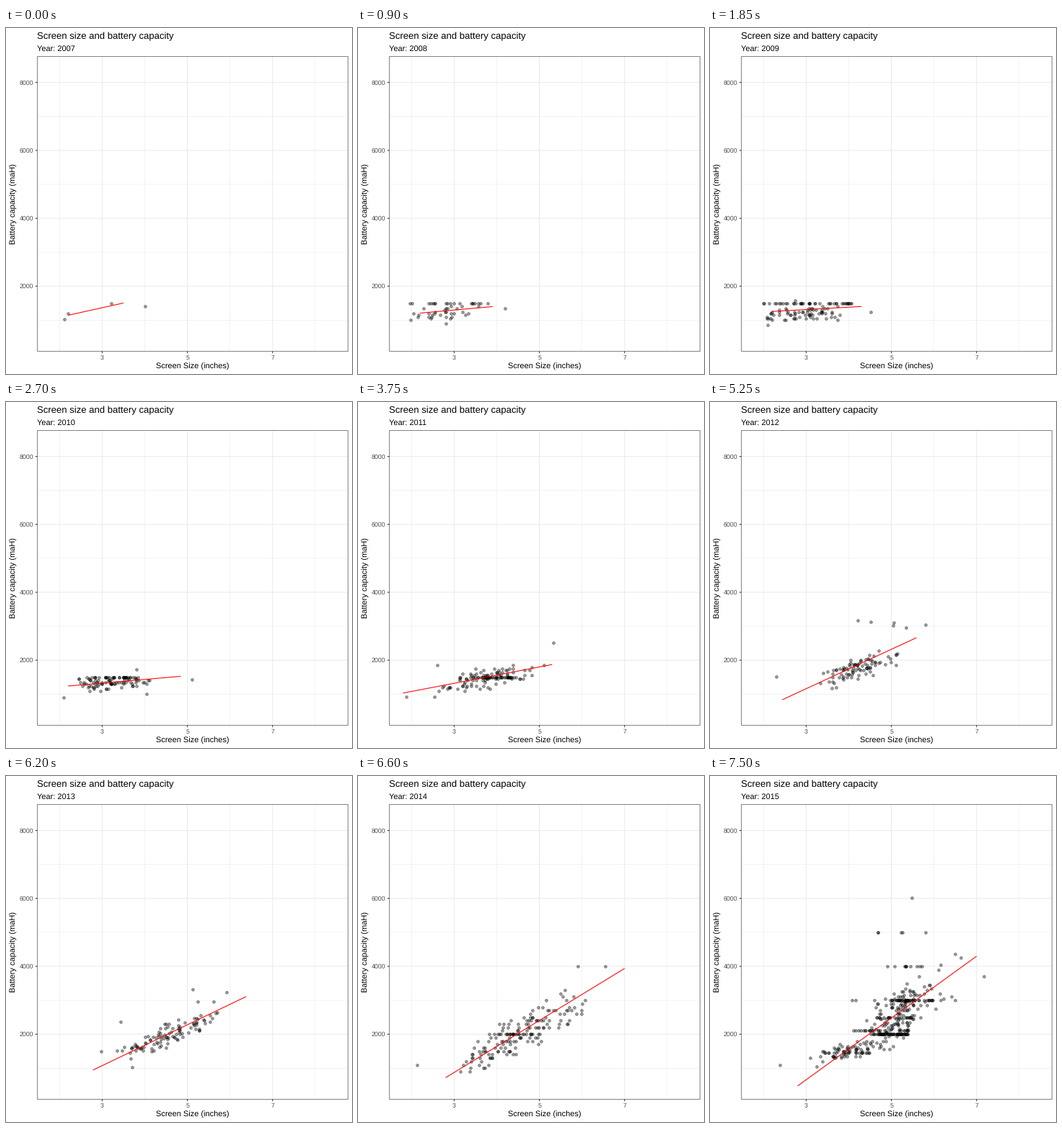
A matplotlib script that plays this animation: 480x480 px, repeating every 8000 ms.

```python
import numpy as np
import matplotlib.pyplot as plt
from matplotlib.animation import FuncAnimation

plt.rcParams["font.family"] = "Liberation Sans"
plt.rcParams["text.hinting"] = "none"

SIZE, DPI, INTERVAL, FRAMES = 480, 80, 50, 160
FIRST_HOLD, CYCLE, STEPS = 10, 19, 9
LEFT, TOP, RIGHT, BOTTOM = 43.5, 39.5, 474.5, 448.5
GRID, DARK, TICK_TEXT = "#EBEBEB", "#333333", "#4D4D4D"
rng = np.random.default_rng(7)


def px(n):
    """Pixels to points."""
    return n * 72 / DPI


def sx(inches):
    return 133.4 + 59.1 * (inches - 3)


def sy(mah):
    return 452.4 - 0.0471 * mah


# Phones of each year, as (inches, mAh)

def band(n, lo, hi, mah):
    """Phones sharing one common battery size."""
    return np.column_stack([rng.uniform(lo, hi, n), np.full(n, mah)])


def trail(n, mid, reach, base, slope, noise, step=50):
    """Phones around a rising line, with rounded battery sizes."""
    x = rng.triangular(mid - reach, mid, mid + reach, n)
    y = base + slope * (x - mid) + rng.triangular(-noise, 0, noise, n)
    return np.column_stack([x, np.maximum(np.round(y / step) * step, 900)])


def year_of(standouts, *groups, shuffle=True):
    body = np.vstack(groups)
    if shuffle:
        body = rng.permutation(body)
    return np.vstack([standouts, body])


def unmix(seen, known, share):
    """Undo a blend that holds the given share of known points."""
    return (seen - share * known[:len(seen)]) / (1 - share)


pts07 = np.array([(2.11, 1030), (2.2, 1205), (3.22, 1505), (4, 1400)])

pts08 = year_of([(1.96, 1500), (4.2, 1350), (2.8, 900)],
                band(18, 2, 3.8, 1500),
                trail(30, 2.8, .9, 1200, 60, 270))

pts09 = year_of([(4.05, 1500), (2.74, 1590), (2.1, 860), (4.52, 1235)],
                band(40, 1.98, 4.1, 1500),
                trail(66, 2.95, 1.1, 1200, 40, 280), shuffle=False)

pts10 = unmix(year_of([(5.1, 1435), (3.81, 1735), (2.09, 905), (4.04, 1000)],
                      band(32, 2.6, 3.85, 1500),
                      trail(73, 3.2, 1, 1310, 40, 250), shuffle=False),
              pts09, 2 / 9)

pts11 = year_of([(5.33, 2505), (5.1, 1855), (1.87, 920), (2.53, 915),
                 (2.6, 1860)],
                band(36, 3.35, 4.45, 1500),
                trail(90, 3.8, 1.4, 1490, 230, 360))

pts14 = year_of([(2.13, 1100), (6.55, 4000), (5.9, 4000), (5.6, 3300)],
                band(14, 3.9, 5.1, 2000),
                trail(150, 4.6, 1.6, 2050, 620, 650, 100))

pts13 = unmix(year_of([(2.98, 1490), (5.92, 3245), (5.13, 3325), (5.25, 2960),
                       (5.61, 2950), (5.7, 2640), (3.44, 2355), (3.7, 1035)],
                      trail(100, 4.5, 1.2, 1940, 480, 430, 25)),
              pts14, 1 / 9)

pts12 = unmix(year_of([(2.3, 1515), (5.8, 3040), (5.04, 3030), (5.05, 3100),
                       (5.34, 2950), (4.52, 3130), (4.21, 3170)],
                      trail(90, 4.25, 1, 1790, 440, 400, 25)),
              pts13, 1 / 9)

pts15 = year_of([(5.48, 6025), (7.18, 3705), (6.5, 4360), (6.63, 4250),
                 (2.39, 1100), (4.69, 5000), (4.69, 5000)],
                band(3, 5.1, 5.9, 5000), band(10, 4.8, 5.9, 4000),
                band(38, 4.9, 6, 3000), band(6, 4, 6.6, 3000),
                band(20, 4.65, 5.5, 2500), band(22, 4.1, 5.4, 2100),
                band(56, 4.5, 5.4, 2000), band(16, 3.4, 4.5, 1450),
                trail(60, 3.9, .9, 1480, 270, 300),
                trail(145, 5.15, .8, 2520, 850, 900),
                trail(14, 5.9, .7, 3200, 400, 900))

clouds = [pts07, pts08, pts09, pts10, pts11, pts12, pts13, pts14, pts15]
trends = [np.array(ends) for ends in (
    [(2.2, 1144), (3.5, 1505)],
    [(2.2, 1208), (3.9, 1400)],
    [(2.2, 1257), (4.3, 1403)],
    [(2.2, 1234), (5, 1561)],
    [(1.8, 1032), (5.3, 1873)],
    [(2.4, 820), (5.5, 2620)],
    [(2.78, 970), (6.3, 3004)],
    [(2.8, 720), (7, 3936)],
    [(2.8, 476), (7, 4297)],
)]

# Chart

fig = plt.figure(figsize=(SIZE / DPI, SIZE / DPI), dpi=DPI, facecolor="white")
ax = fig.add_axes([0, 0, 1, 1])
ax.set_xlim(0, SIZE)
ax.set_ylim(SIZE, 0)
ax.axis("off")


def stroke(x, y, color, width, z):
    return ax.plot(x, y, color=color, lw=px(width), zorder=z, snap=False,
                   solid_capstyle="butt", solid_joinstyle="miter")[0]


def label(x, y, text, size, color="black", **kw):
    return ax.text(x, y, text, fontsize=px(size), color=color, va="baseline",
                   rotation_mode="anchor", **kw)


def grid_x(inches, width, z):
    stroke([sx(inches)] * 2, [TOP, BOTTOM], GRID, width, z)


def grid_y(mah, width, z):
    stroke([LEFT, RIGHT], [sy(mah)] * 2, GRID, width, z)


for v in (2, 4, 6, 8):
    grid_x(v, .6, 0)
    grid_y((v - 1) * 1000, .6, 0)
for v in (3, 5, 7):
    grid_x(v, 1.07, 1)
    stroke([sx(v)] * 2, [BOTTOM, BOTTOM + 2.75], DARK, 1.07, 1)
    label(sx(v), 460.2, str(v), 8.8, TICK_TEXT, ha="center")
for v in (2000, 4000, 6000, 8000):
    grid_y(v, 1.07, 1)
    stroke([LEFT - 2.75, LEFT], [sy(v)] * 2, DARK, 1.07, 1)
    label(38.2, sy(v) + 3.2, str(v), 8.8, TICK_TEXT, ha="right")
stroke([LEFT, RIGHT, RIGHT, LEFT, LEFT], [TOP, TOP, BOTTOM, BOTTOM, TOP],
       DARK, .6, 5)

label(43, 15, "Screen size and battery capacity", 13.1)
label(258.7, 473, "Screen Size (inches)", 11, ha="center")
label(14, 244, "Battery capacity (maH)", 11, rotation=90, ha="center")
year = label(43, 32, "", 11)

dots = ax.scatter([], [], s=px(3.9) ** 2, facecolor=(0, 0, 0, .4),
                  edgecolor=(0, 0, 0, .4), linewidths=px(.71), zorder=3,
                  snap=False)
trend = stroke([], [], "#FF0000", 1.07, 4)


def mix(a, b, t):
    n = min(len(a), len(b))
    return a[:n] + t * (b[:n] - a[:n])


def draw(i):
    # k is the year being reached, t the share of the way there.
    if i < FIRST_HOLD:
        k, t = 0, 1
    else:
        k, step = divmod(i - FIRST_HOLD, CYCLE)
        k += 1
        steps = STEPS - 1 if k == len(clouds) - 1 else STEPS
        t = min((step + 1) / steps, 1)
    # Unmatched points exist only while a year is at rest.
    pts = clouds[k] if t == 1 else mix(clouds[k - 1], clouds[k], t)
    line = trends[k] if t == 1 else mix(trends[k - 1], trends[k], t)
    dots.set_offsets(np.column_stack([sx(pts[:, 0]), sy(pts[:, 1])]))
    trend.set_data(sx(line[:, 0]), sy(line[:, 1]))
    year.set_text(f"Year: {2007 + k - (t <= .5)}")
    return dots, trend, year


anim = FuncAnimation(fig, draw, frames=FRAMES, interval=INTERVAL, repeat=True,
                     repeat_delay=0, blit=False)
plt.show()
```
